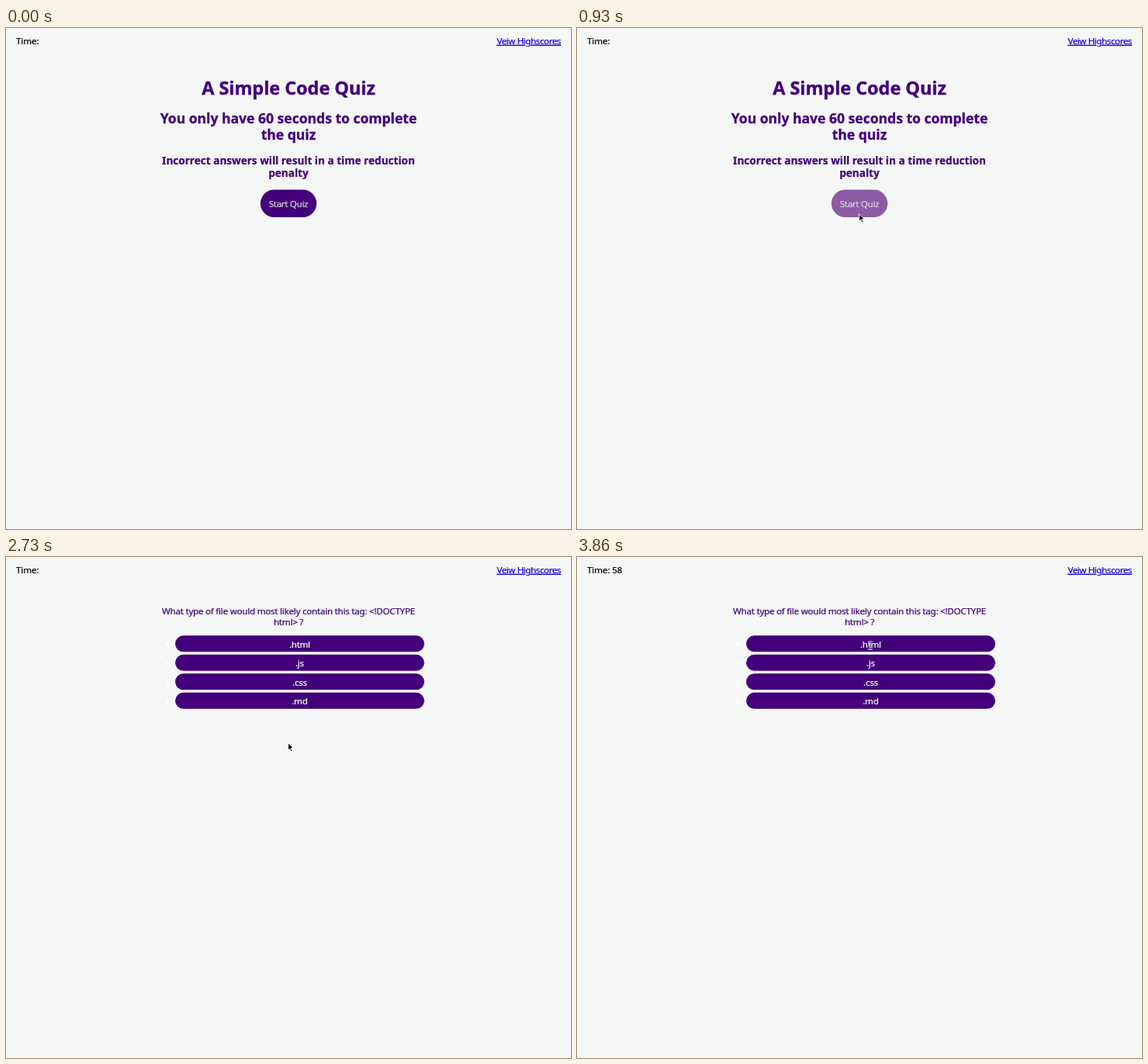
An HTML page for the animation above (4 s loop, 728x646 px).

```html
<!DOCTYPE html>
<html lang="en">
<head>
<meta charset="utf-8">
<title>Code quiz</title>
<style>
  html, body { margin: 0; width: 100%; height: 100%; overflow: hidden; background: #f5f7f6; }
  svg { display: block; width: 728px; height: 646px; font: 11.6px "Noto Sans", "Open Sans", sans-serif; }
  text { fill: currentColor; stroke: currentColor; stroke-width: .22px; }
  .mid { text-anchor: middle; }
  .ink { color: #43007a; fill: currentColor; }
  .title { font-size: 23.4px; font-weight: 700; stroke-width: .4px; }
  .sub { font-size: 17.55px; font-weight: 700; stroke-width: .3px; }
  .note { font-size: 13.58px; font-weight: 700; }
  .link { color: #1500d6; text-anchor: end; text-decoration: underline; letter-spacing: -.037em; }
  .question { letter-spacing: -.021em; }
  .button { color: #dcd6e2; letter-spacing: -.028em; }
  .answer { color: #fff; letter-spacing: -.025em; }
</style>
</head>
<body>
<svg viewBox="0 0 728 646">
  <text id="timer" x="13" y="20.8" letter-spacing="-.1">Time:</text>
  <text class="link" x="715" y="20.8">Veiw Highscores</text>

  <g id="intro" class="mid">
    <g class="ink">
      <text class="title" x="364" y="85.6">A Simple Code Quiz</text>
      <text class="sub" x="364" y="123.2">You only have 60 seconds to complete</text>
      <text class="sub" x="364" y="144">the quiz</text>
      <text class="note" x="364" y="175.6">Incorrect answers will result in a time reduction</text>
      <text class="note" x="364" y="192">penalty</text>
    </g>
    <rect id="start" x="327.8" y="208.5" width="72.4" height="35.5" rx="17.75"/>
    <text class="button" x="364" y="231">Start Quiz</text>
  </g>

  <g id="quiz" class="mid">
    <text class="ink question" x="364" y="74.2">What type of file would most likely contain this tag: &lt;!DOCTYPE</text>
    <text class="ink question" x="364" y="88">html&gt; ?</text>
    <g id="answers"></g>
  </g>

  <g id="pointer">
    <path id="arrow" d="M0 0V9.6L2.2 7.6L3.8 11.3L5.5 10.6L3.9 7H6.9Z" stroke="#fff" stroke-linejoin="round"/>
    <g id="beam" fill="none" stroke-linecap="round">
      <path id="stem" d="M-2-5Q0-5 0-4Q0-5 2-5M0-4V4M-2 5Q0 5 0 4Q0 5 2 5M-1 1.5H1" stroke="#fff" stroke-width="1.8"/>
      <use href="#stem" style="display:none"/>
    </g>
  </g>
</svg>
<script>
  const LOOP = 4000, FPS = 15;
  const HOVER_AT = 730, QUIZ_AT = 2730, TICK_AT = 3730, BEAM_AT = 3860;

  // Each glide holds its end point until the next one begins.
  const glides = [
    { start: 400, end: 867, from: [386, 292], to: [363.4, 239.6], ease: p => 1 - (1 - p) ** 3 },
    { start: 3133, end: 3467, from: [363.4, 239.6], to: [350, 208], ease: p => p * p },
    { start: 3600, end: 3867, from: [339, 174], to: [378, 114], ease: p => p }
  ];

  const el = id => document.getElementById(id);
  const show = (id, on) => el(id).setAttribute("visibility", on ? "visible" : "hidden");

  el("answers").innerHTML = [".html", ".js", ".css", ".md"].map((label, i) => {
    const y = 101.3 + i * 24.5;
    return `<circle cx="207.6" cy="${y + 11.7}" r="2" fill="#fff"/>
      <rect class="ink" x="218" y="${y}" width="321" height="21" rx="10.5"/>
      <text class="answer" x="378.4" y="${y + 15.3}">${label}</text>`;
  }).join("");

  const onBeat = t => Math.floor((t + 7) * FPS / 1000) * 1000 / FPS;

  function pointerAt(t) {
    const glide = glides.filter(g => g.start <= t).pop();
    if (!glide) return null;
    const { start, end, from, to, ease } = glide;
    const p = ease(Math.min(1, (t - start) / (end - start)));
    return from.map((a, i) => a + (to[i] - a) * p);
  }

  function draw(t) {
    const inQuiz = t >= QUIZ_AT, beam = t >= BEAM_AT;
    show("intro", !inQuiz);
    show("quiz", inQuiz);
    el("start").setAttribute("fill", t >= HOVER_AT ? "#8d5ba4" : "#43007a");
    el("timer").textContent = t >= TICK_AT ? "Time: 58" : "Time:";

    const spot = pointerAt(onBeat(t));
    show("arrow", spot && !beam);
    show("beam", beam);
    if (spot) el("pointer").setAttribute("transform", `translate(${spot})`);
  }

  // Dark core over the light outline of the text cursor
  const core = el("stem").cloneNode();
  core.removeAttribute("id");
  core.setAttribute("stroke", "#222");
  core.setAttribute("stroke-width", ".8");
  el("beam").querySelector("use").replaceWith(core);

  const begin = performance.now();
  function frame() {
    draw((performance.now() - begin) % LOOP);
    requestAnimationFrame(frame);
  }
  frame();
</script>
</body>
</html>
```
